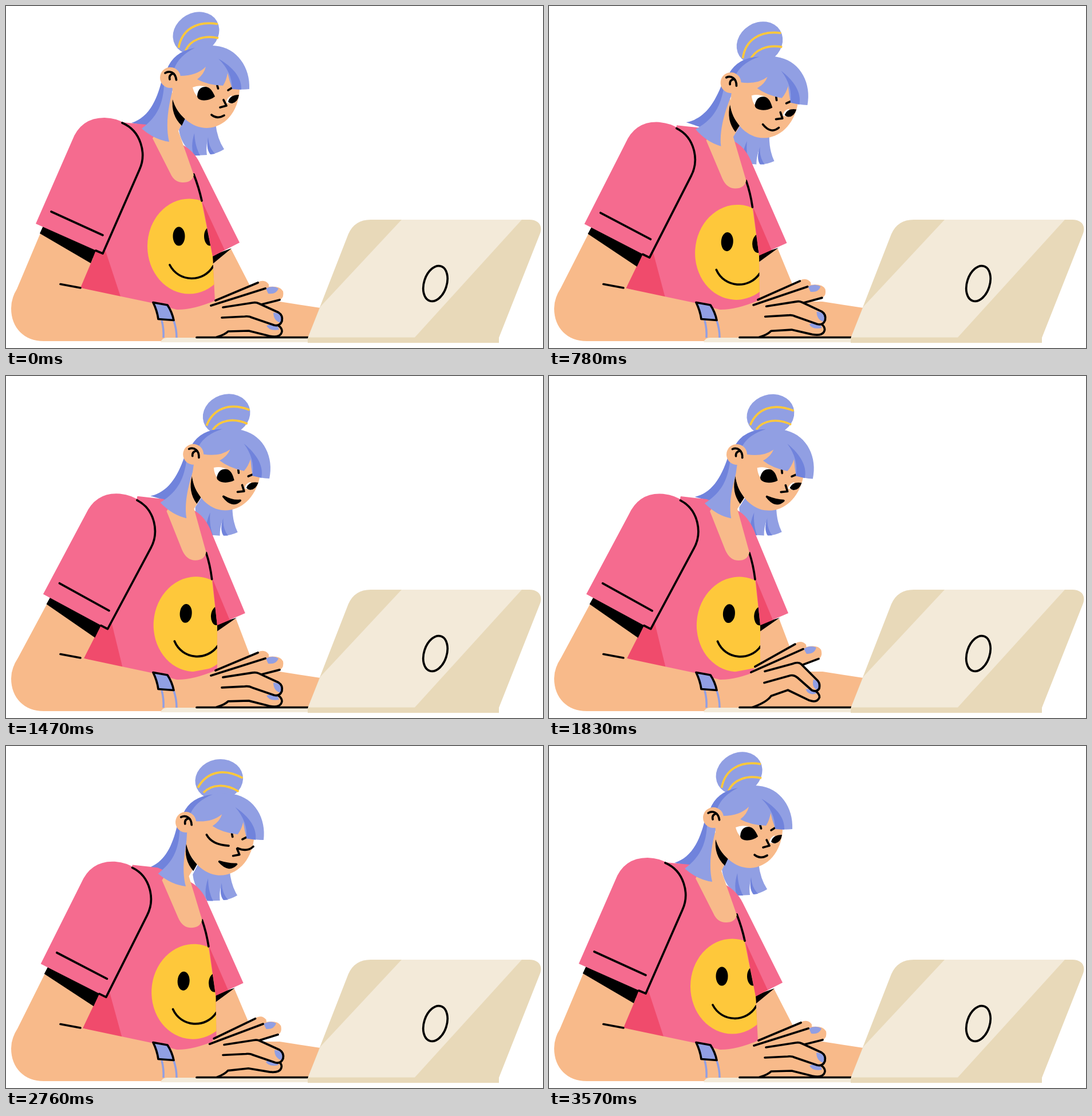
Animation of 938 by 597 pixels, one loop 3.6 s. Source, as an HTML page:

```html
<!DOCTYPE html>
<html lang="en">
<head>
<meta charset="utf-8">
<title>Typing at a laptop</title>
<style>
  html, body { margin: 0; height: 100%; overflow: hidden; background: #fff; }
  svg { display: block; width: 938px; height: 597px; }
  .line { fill: none; stroke: #000; stroke-width: 3.7; stroke-linecap: round; stroke-linejoin: round; }
</style>
</head>
<body>
<svg id="stage" viewBox="0 0 938 597"></svg>
<script>
const LOOP = 3600;
const SKIN = '#f8ba8a', PINK = '#f56b8f', ROSE = '#f04b6c', HAIR = '#919fe3', SHADE = '#7083dc',
      YELLOW = '#fec83b', CREAM = '#f3ead9', SAND = '#e8d9b9', BLACK = '#000', WHITE = '#fff';

// Monotone cubic curve through [time, value] points
function track(...points) {
  const slope = points.slice(1).map(([t, v], i) => (v - points[i][1]) / (t - points[i][0]));
  const tangent = points.map((_, i) => {
    const a = slope[i - 1], b = slope[i];
    return a * b > 0 ? 2 * a * b / (a + b) : 0;
  });
  return time => {
    let i = 0;
    while (i < slope.length - 1 && time >= points[i + 1][0]) i++;
    const [t0, v0] = points[i], [t1, v1] = points[i + 1];
    const span = t1 - t0, x = (time - t0) / span, y = 1 - x;
    return v0 * (1 + 2 * x) * y * y + v1 * x * x * (3 - 2 * x) +
      span * x * y * (tangent[i] * y - tangent[i + 1] * x);
  };
}
const POSES = [0, 480, 1110, 1830, 2340, 2760, LOOP];
const posed = (...values) => track(...POSES.map((t, i) => [t, values[i]]));

const lean = posed(0, .48, .93, 1, .93, .66, 0);
const headTurn = posed(0, 6, 9.2, 9.5, 8, 4.6, 0);
const lockTurn = posed(0, 8.7, 6.2, 4, 2, -1, 0);
const bunTurn = posed(0, -8.5, 7, 13, 12, 19, 0);
const smile = track([0, 0], [480, .5], [1110, 1], [2900, 1], [3300, 0], [LOOP, 0]);
const mouthOpen = track([0, 0], [1250, 0], [1550, 1], [2880, 1], [3150, 0], [LOOP, 0]);
const eyeOpen = track([0, 1], [2600, 1], [2720, 0], [2800, 0], [2920, 1], [LOOP, 1]);
const fingerCurl = track([0, 0], [180, .2], [390, 1], [480, 1], [600, 0], [720, 0]);
const fingerLift = track([0, 0], [700, 0], [900, 1], [1100, 0], [1630, 0], [1830, 1], [2030, 0],
  [2560, 0], [2760, 1], [2960, 0], [LOOP, 0]);

const NUMBER = /-?[\d.]+/g;
function mix(a, b, k) {
  const target = b.match(NUMBER);
  let i = 0;
  return a.replace(NUMBER, v => (+v + (target[i++] - v) * k).toFixed(2));
}
const fill = (color, d) => `<path fill="${color}" d="${d}"/>`;
const line = d => `<path class="line" d="${d}"/>`;
const oval = (color, cx, cy, rx, ry = rx, turn = 0) =>
  `<ellipse fill="${color}" cx="${cx}" cy="${cy}" rx="${rx}" ry="${ry}" transform="rotate(${turn} ${cx} ${cy})"/>`;
const group = (transform, ...parts) => `<g transform="${transform}">${parts.join('')}</g>`;
const EAR = '287 125';

function farArm(k) {
  return fill(SKIN, mix('M345 440L393 424L427 490L446 516L478 516L549 527L528 580L340 580Z',
    'M352 440L402 424L427 490L446 516L478 516L549 527L528 580L340 580Z', k)) +
    fill(BLACK, mix('M355 437L394 423L360 451Z', 'M362 434L403 422L367 447Z', k));
}

function torso(k) {
  const front = mix('M200 300L330 294L341 338L361 437L365 516L200 540Z',
    'M200 300L350 309L360 354L369 434L369 508L200 540Z', k);
  return fill(PINK, mix(
      'M203 203L245 207L308 242Q328 253 338 273L408 413L361 437L365 516Q345 540 298 540L130 492L175 380Z',
      'M230 210L275 215L330 235Q350 246 361 277L418 414L369 435L369 510Q345 540 298 540L136 493L190 380Z', k)) +
    fill(ROSE, mix('M155 424L174 428L201 510L130 492Z', 'M164 430L185 432L204 510L136 493Z', k)) +
    `<clipPath id="front"><path d="${front}"/></clipPath><g clip-path="url(#front)">` +
    group(`translate(${11 * k} ${14 * k}) rotate(${4.5 * k} 320 419)`,
      oval(YELLOW, 320, 419.5, 73, 83),
      oval(BLACK, 302, 402, 10.5, 16.5), oval(BLACK, 356.5, 402, 10.5, 16.5),
      line('M286 452C302 483 345 483 362 454')) + '</g>' +
    fill(ROSE, mix('M343 342L382 426L361 437Z', 'M361 354L391 426L369 435Z', k)) +
    line(mix('M328 294Q337 317 342 340', 'M350 309Q357 330 360 355', k)) +
    fill(SKIN, mix(
      'M256 231L287 292Q294 308 309 308Q325 308 328 295L301 218L310 200L290 150L283 150L272 205Z',
      'M281 236L308 304Q316 322 331 322Q347 322 350 308L329 232L340 215L325 165L318 165L302 205Z', k));
}

function bun(turn) {
  return group(`rotate(${turn} 340 75)`,
    oval(HAIR, 332, 47.5, 42, 35.5, -30),
    `<g fill="none" stroke="${YELLOW}" stroke-width="3.7">
      <path d="M301.5 73C307 42 332 25 370 31.5"/><path d="M313.5 78C322 59 345 50 371 56"/></g>`);
}

function eyes(open) {
  if (open < .2) return line('M325 144Q336 161 365 160') + line('M381 163Q398 169 408 158');
  return group(`translate(0 ${160 * (1 - open)}) scale(1 ${open})`,
    fill(WHITE, 'M326 142Q338 137 350 141L344 164Q330 159 326 142Z'),
    fill(BLACK, 'M334 157C335 145 341 141 349 141C357 142 361 149 365 158C354 167 334 167 334 157Z'),
    fill(WHITE, 'M385 169Q385 160 394 156L394 170Z'),
    fill(BLACK, 'M388 167Q391 155 407 155Q405 168 395 170Q390 170 388 167Z'));
}

function mouth(t) {
  const s = smile(t), low = 198 + 8 * s, high = low - 13 * mouthOpen(t);
  const x = 359 - 8 * s, y = 190 - s;
  return `<path class="line" style="fill:#000" d="M${x} ${y}Q369 ${low} 381 191Q369 ${high} ${x} ${y}"/>`;
}

function head(t) {
  return fill(BLACK, 'M291 162Q297 185 313 196L307 209Q288 191 291 162Z') +
    fill(SKIN, 'M290 115L291 163C301 193 325 213 351 213C382 212 406 185 408 146L400 105L310 95Z') +
    eyes(eyeOpen(t)) +
    line('M380 164L385 174L374 177') + line('M369 139L370.5 144') + line('M388 147L396 142') + mouth(t) +
    fill(HAIR, `M281 111C298 76 335 66 366 69.5C404 73 427 108 425 145Q410 147 395 144
      Q390 130 387 117Q385 130 379 139Q352 138 334 128Q346 119 349 106Q333 122 304 122Q295 112 281 111Z`) +
    fill(SHADE, 'M281 111Q292 80 330 73Q302 87 294 109Z') +
    fill(SHADE, 'M371 92C397 107 412 125 411 146L395 145Q395 115 371 92Z') +
    oval(SKIN, 287, 125, 18) +
    line('M278 117C286 112 296 116 297.5 129') + line('M286 128Q284 120 292 118');
}

const backHair = () => fill(SHADE, 'M272 130C262 170 247 195 219 204L245 209L262 205L290 140Z');
const lock = () => fill(HAIR, 'M276 138C274 175 262 195 237 214Q260 234 285 237C277 205 286 165 292 143Z');
const tail = () =>
  fill(HAIR, `M302 216L312 195L366 205Q369 232 381 250Q370 257 358 259Q350 250 352 234
    Q349 248 351 260L331 261Q306 245 302 216Z`) +
  fill(SHADE, 'M329 222Q322 245 328 261L339 261Q330 245 329 222Z') +
  fill(SHADE, 'M353 229Q349 250 357 259L365 258Q354 247 353 229Z');

function nearArm(k) {
  return fill(SKIN, mix(
      `M62 392L19 494Q9 510 9 528C9 562 32 585 66 585L345 585L380 580L384 530L366 514Q325 531 298 530
        L258 519L130 492L152 440Z`,
      `M76 390L21 492Q9 510 9 528C9 562 32 585 66 585L345 585L380 580L384 530L366 514Q325 531 298 530
        L258 519L136 493L160 446Z`, k)) +
    group(`rotate(${4.5 * k} 50 548)`,
      fill(BLACK, 'M65 384L158 424L148 449L59 397Z'),
      fill(PINK, 'M52 380L115 236Q130 195 172 195Q195 196 207 205C236 220 246 258 233 286L169 432Z'),
      line('M203 204C236 218 246 258 233 286L169 432L157 427'), line('M79 359L169 400')) +
    line('M95 485.5L130 492') +
    `<path d="M272 549Q276 564 275 579M293 549Q298 564 298 579" fill="none" stroke="${HAIR}" stroke-width="3.5"/>
     <path class="line" style="fill:${HAIR}" d="M257 517.5L282 522Q290 534 293 548.5L266 546.5Q264 532 257 517.5Z"/>`;
}

function hands(curl, lift) {
  const upper = mix(
    'M379 526L431 518Q437 517 441 519L476 535Q484 540 482 550Q478 560 468 557L430 544Q424 541 417 542L377 544',
    'M375 520L423 507Q433 503 438 507L467 536Q472 541 470 550Q466 557 457 553L432 531Q425 525 417 528L374 540', curl);
  const lower = mix(
    'M368 578Q382 574 388 568L424 567L460 576Q480 580 482 568Q482 562 476 558',
    'M352 578Q380 571 389 560L419 552L455 573Q468 579 473 569Q474 562 465 556', curl);
  const lowerTop = mix('L430 544L377 544', 'L432 531L374 540', curl);
  return group(`rotate(${-6.5 * (.53 * curl + .47 * lift)} 304 565)`,
      fill(SKIN, `M366 514L440 482Q452 476 459 486L459 490Q479 488 484 498Q486 510 478 513L446 521
        L420 540L358 526Z`),
      fill(HAIR, 'M454 493Q466 487 476 493Q472 504 458 502Z'),
      line('M366 514L440 483'), line('M358 523L453 493'), line('M446 521L478 513')) +
    group(`rotate(${-4.5 * lift} 370 572)`, fill(SKIN, lower + lowerTop),
      fill(HAIR, mix('M455 558Q460 568 477 565Q476 557 464 555Z', 'M450 553Q454 565 468 562Q470 557 462 553Z', curl)),
      line(lower)) +
    group(`translate(${2 * lift} ${-4.5 * lift})`, fill(SKIN, upper),
      fill(HAIR, mix('M467 535Q467 549 479 553Q486 545 478 537Z', 'M460 534Q456 548 467 553Q474 547 467 537Z', curl)),
      line(upper));
}

const laptop =
  fill(CREAM, 'M270 587Q273 579 281 579L528 579L528 587Z') + line('M333 578.5L528 578.5') +
  fill(SAND, 'M527 588L527 580L598 398Q609 373 637 373L914 373C929 373 938 382 933 397L861 579L861 588Z') +
  fill(CREAM, 'M691 373L901 373L714 578.5L527.5 578.5L549 525Z') +
  '<ellipse class="line" cx="750" cy="484.5" rx="19.8" ry="31.8" transform="rotate(18 750 484.5)"/>';

const stage = document.getElementById('stage');
function draw(t) {
  const k = lean(t), turn = headTurn(t), swing = lockTurn(t);
  const follow = (angle, ...parts) =>
    group(`translate(${41 * k} ${12 * k}) rotate(${angle} ${EAR})`, ...parts);
  stage.innerHTML =
    follow((turn + swing) / 2, tail()) + follow(swing, backHair()) +
    farArm(k) + torso(k) + follow(swing, lock()) +
    follow(turn, bun(bunTurn(t) - turn), head(t)) +
    nearArm(k) + hands(fingerCurl(t % 720), fingerLift(t)) + laptop;
}

function frame() {
  draw(performance.now() % LOOP);
  requestAnimationFrame(frame);
}
frame();
</script>
</body>
</html>
```
